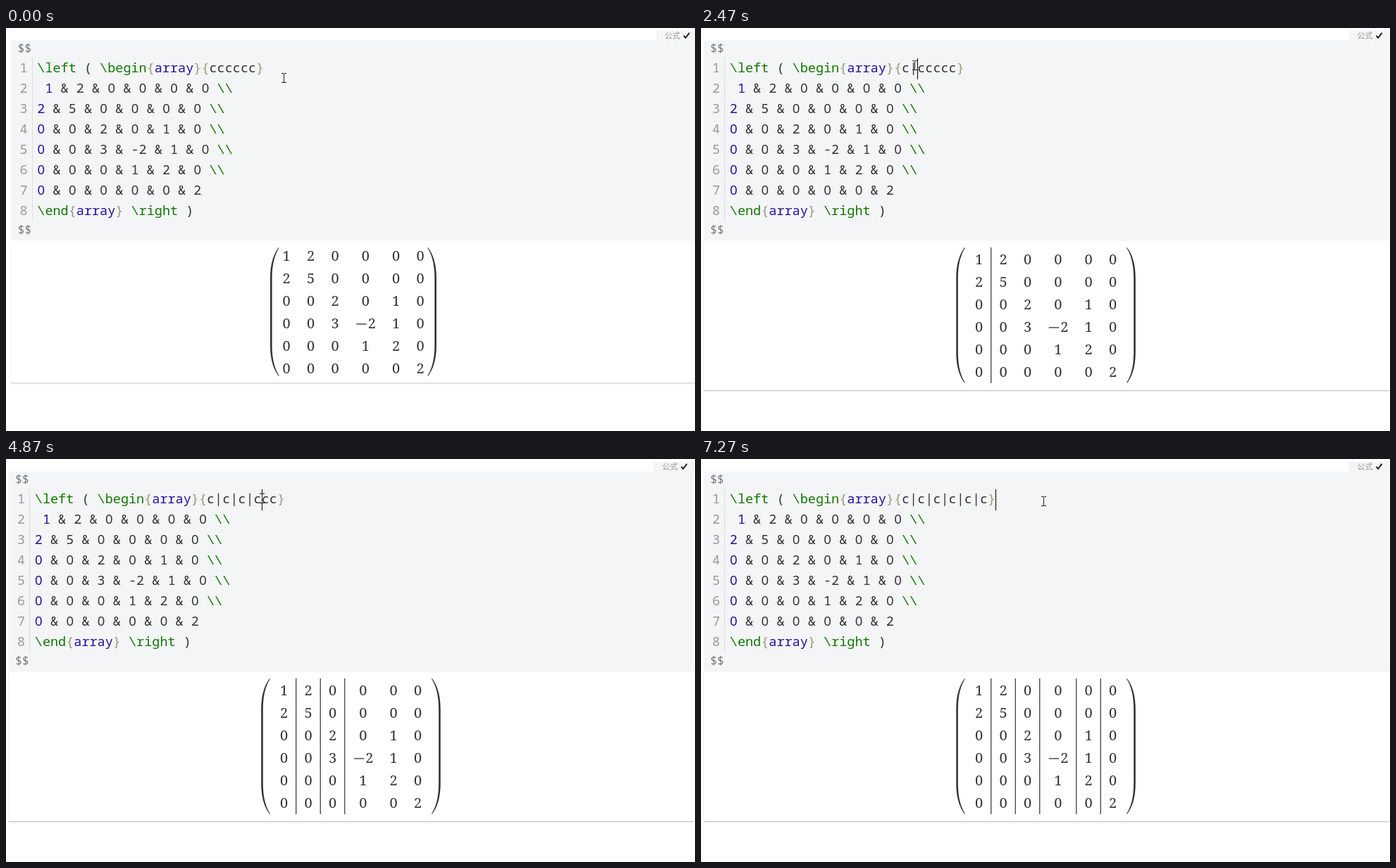
An HTML page with a canvas that plays this animation: 978 by 573 pixels, repeating every 7.81 s.

```html
<!DOCTYPE html>
<html lang="zh">
<head>
<meta charset="utf-8">
<style>
html, body { margin: 0; width: 100%; height: 100%; overflow: hidden; background: #fff; }
canvas { display: block; }
</style>
</head>
<body>
<canvas id="stage" width="978" height="573"></canvas>
<script>
const ctx = document.getElementById('stage').getContext('2d');
const LOOP = 7810, STEP = 200 / 3, BLINK = 530, PITCH = 11.1, ROW = 29;
const INK = '#333', GREEN = '#117700', BRACE = '#999977', ATOM = '#221199';
const MONO = '"Noto Sans Mono", monospace';
const CENTER = 493, CELL = 11.5, GAP = 23, MINUS = 17.5;

const rows = [
  '1 & 2 & 0 & 0 & 0 & 0',
  '2 & 5 & 0 & 0 & 0 & 0',
  '0 & 0 & 2 & 0 & 1 & 0',
  '0 & 0 & 3 & -2 & 1 & 0',
  '0 & 0 & 0 & 1 & 2 & 0',
  '0 & 0 & 0 & 0 & 0 & 2'
];
const cells = rows.map(row => row.split(' & '));

// each column is as wide as its widest entry
const widths = rows.map((_, c) => CELL + (cells.some(row => row[c] < 0) ? MINUS : 0));
const total = widths.reduce((sum, w) => sum + w + GAP, -GAP);
const lefts = widths.map((_, c) =>
  widths.slice(0, c).reduce((x, w) => x + w + GAP, CENTER - total / 2));

// the preview jumps sideways with every typed bar
const shiftFor = bars => bars % 2 ? -3.5 : 0;
const caretX = (bars, col) => 44.3 + shiftFor(bars) + col * PITCH;

const barTimes = [2470, 3400, 4270, 5200, 6000];
const edits = [
  { at: 0, bars: 0, line: 3, col: 24 },
  { at: 600, bars: 0, line: 0, col: 22 },
  { at: 1130, bars: 0, line: 0, col: 23 }
];
const glides = [
  { at: 0, span: 330, x: 285, y: 58 },
  { at: 470, span: 200, x: 293, y: 57 },
  { at: 870, span: 230, x: 302.5, y: 53 }
];
barTimes.forEach((at, i) => {
  const bars = i + 1, last = bars === barTimes.length;
  const col = 23 + 2 * bars + (last ? 1 : 0);
  edits.push({ at, bars, line: 0, col: 22 + 2 * bars });
  edits.push({ at: at + (last ? 200 : 500), bars, line: 0, col });
  glides.push(last
    ? { at, span: 200, x: 486, y: 60 }
    : { at, span: 400, x: caretX(bars, col), y: 49.5 + 2 * bars });
});

function pointerAt(t) {
  let x = 394, y = 71;
  for (const g of glides) {
    const u = Math.min(1, Math.max(0, (t - g.at) / g.span));
    const k = u * u * (3 - 2 * u);
    x += (g.x - x) * k;
    y += (g.y - y) * k;
  }
  return [Math.round(x), Math.round(y)];
}

function sourceLines(bars) {
  const spec = [...'cccccc'].map((c, i) => c + (i < bars ? '|' : '')).join('');
  const body = rows.map((row, i) => (i ? '' : ' ') + row + (i < 5 ? ' \\\\' : ''));
  return ['\\left ( \\begin{array}{' + spec + '}', ...body, '\\end{array} \\right )'];
}

function text(str, x, y, font, color, align = 'left') {
  ctx.font = font;
  ctx.fillStyle = color;
  ctx.textAlign = align;
  ctx.fillText(str, x, y);
}

function box(x, y, w, h, color) {
  ctx.fillStyle = color;
  ctx.fillRect(x, y, w, h);
}

function codeFont(ch) {
  // a plain zero and wide backslashes
  const family = ch === '0' ? '"Noto Sans", sans-serif'
    : ch === '\\' ? '"Liberation Mono", monospace' : MONO;
  return '18.5px ' + family;
}

function codeLine(line, x, y) {
  const tokens = /\\[a-z]+|\\\\|[{}]|array|^ ?\d|./g;
  for (const { 0: token, index } of line.matchAll(tokens)) {
    const color = token[0] === '\\' ? GREEN
      : /[{}]/.test(token) ? BRACE
      : token === 'array' || (index === 0 && /\d/.test(token)) ? ATOM : INK;
    [...token].forEach((ch, i) =>
      text(ch, x + (index + i + 0.5) * PITCH, y, codeFont(ch), color, 'center'));
  }
}

function paren(mid, side, top, bottom) {
  const at = d => mid + side * d;
  ctx.beginPath();
  ctx.moveTo(at(-10.8), top);
  ctx.bezierCurveTo(at(-4), top + 9, at(1.3), top + 22, at(1.3), top + 44);
  ctx.lineTo(at(1.3), bottom - 44);
  ctx.bezierCurveTo(at(1.3), bottom - 22, at(-4), bottom - 9, at(-10.8), bottom);
  ctx.lineTo(at(-11.4), bottom - 0.8);
  ctx.bezierCurveTo(at(-6), bottom - 9, at(-1.3), bottom - 22, at(-1.3), bottom - 44);
  ctx.lineTo(at(-1.3), top + 44);
  ctx.bezierCurveTo(at(-1.3), top + 22, at(-6), top + 9, at(-11.4), top + 0.8);
  ctx.fillStyle = INK;
  ctx.fill();
}

function preview(bars, shift) {
  const ruled = bars > 0;
  const reach = ruled ? 126 : 116.7, bottom = ruled ? 505 : 495;
  for (const side of [-1, 1]) paren(CENTER + shift + side * reach, side, 312, bottom);
  cells.forEach((row, r) => row.forEach((value, c) => {
    const x = lefts[c] + widths[c] / 2 + shift;
    const y = (ruled ? 335.5 : 330.5) + r * 32;
    const negative = value < 0;
    if (negative) box(x - 13, y - 6.2, 14.5, 1.3, INK);
    text(Math.abs(value), x + (negative ? 9 : 0), y,
      '20px "Noto Serif", serif', INK, 'center');
  }));
  for (let c = 0; c < bars; c++) {
    box(lefts[c] + widths[c] + GAP / 2 + shift - 0.6, 312, 1.2, 193, INK);
  }
}

function beam(x, y) {
  box(x, y - 6, 1, 13, '#222');
  for (const edge of [y - 7, y + 6]) {
    box(x - 3, edge, 3, 1, '#222');
    box(x + 1, edge, 3, 1, '#222');
  }
}

function tick(x) {
  ctx.beginPath();
  ctx.moveTo(x - 4, 11);
  ctx.lineTo(x - 1.3, 14);
  ctx.lineTo(x + 4, 6.8);
  ctx.strokeStyle = '#222';
  ctx.lineWidth = 2;
  ctx.stroke();
}

function draw(t) {
  const { at, bars, line, col } = edits.filter(e => e.at <= t).pop();
  const shift = shiftFor(bars);
  const left = 7 + shift, right = shift ? 977 : 978;
  const end = bars ? 515 : 504.5;

  box(0, 0, 978, 573, '#fff');
  box(923 + shift, 4, right - 923 - shift, 14, '#f4f5f7');
  box(left, 17.5, right - left, 285, '#f4f5f7');
  box(left, end, right - left, 1, '#c4c4c4');
  box(left, end + 1, right - left, 1, '#eee');
  box(left - 0.5, 303, 0.5, end - 303, '#e8e8e8');
  text('公式', 935 + shift, 14.5, '11px "Noto Sans CJK SC", "Noto Sans CJK", sans-serif', '#999');
  tick(966 + shift);

  for (const y of [35, 293]) text('$$', 16.8 + shift, y, '16px ' + MONO, '#777');
  box(Math.round(36.8 + shift), 43, 1, 232, '#ddd');
  sourceLines(bars).forEach((str, i) => {
    const y = 63 + i * ROW;
    text(i + 1, 30.5 + shift, y, '18.5px ' + MONO, '#999', 'right');
    codeLine(str, caretX(bars, 0), y);
  });
  preview(bars, shift);

  const phase = Math.floor((t - at) / BLINK) % 2;
  const caretOn = line ? t >= 465 : phase === 0;
  if (caretOn) box(Math.round(caretX(bars, col) - 0.2), 43 + line * ROW, 1, 30, '#000');
  beam(...pointerAt(t));
}

const start = performance.now();
function frame() {
  const t = (performance.now() - start) % LOOP;
  draw(Math.round(Math.floor((t + 4) / STEP) * STEP / 10) * 10);
  requestAnimationFrame(frame);
}
frame();
</script>
</body>
</html>
```
